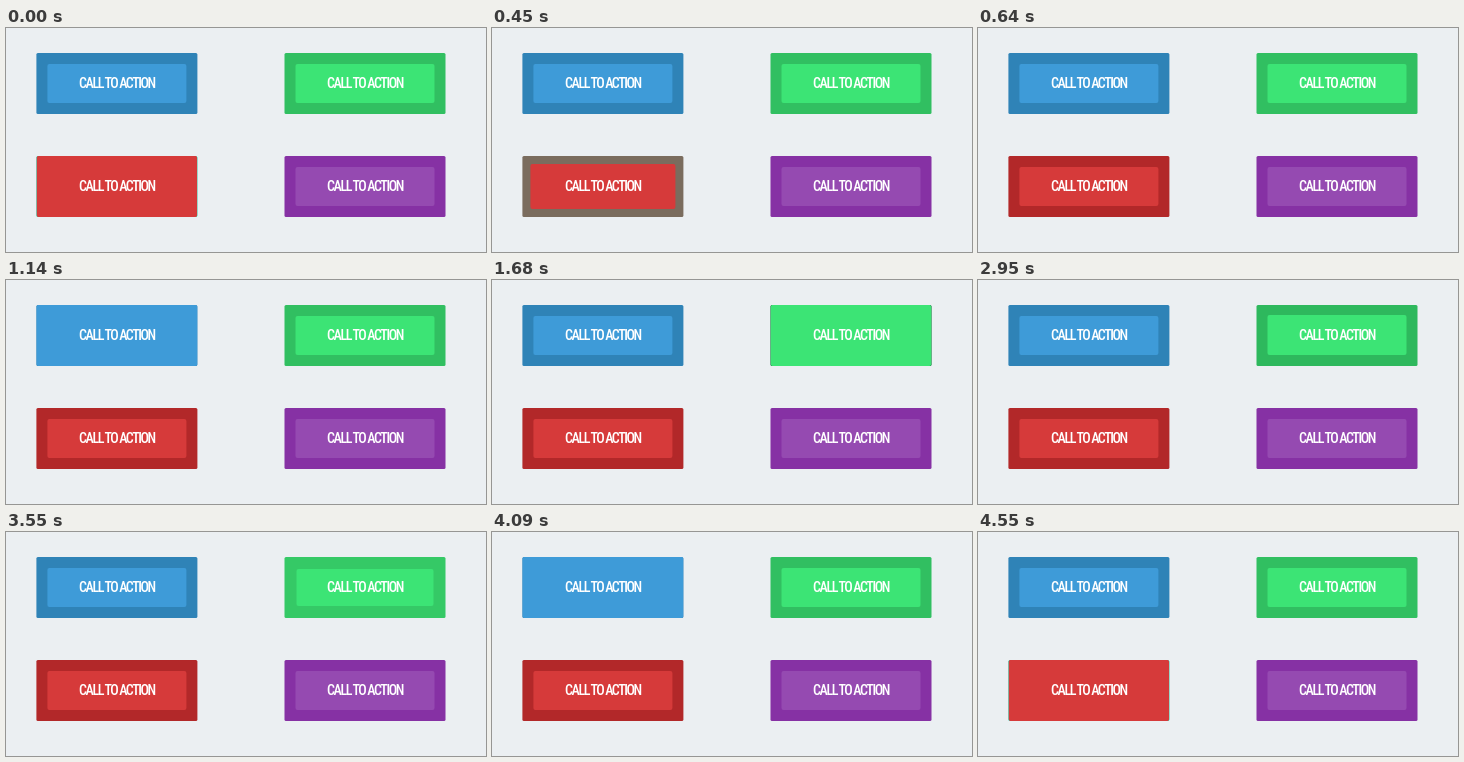
Write an HTML page that moves like this. It is 480 px wide and 224 px high and loops after 4.6 s.

```html
<!DOCTYPE html>
<html lang="en">
<head>
<meta charset="utf-8">
<title>Call to action buttons</title>
<style>
  html, body { margin: 0; width: 100%; height: 100%; overflow: hidden; background: #ebeff2; }
  .button {
    position: absolute;
    left: 0;
    top: 0;
    width: 161px;
    height: 60.5px;
    border-radius: 1.5px;
    overflow: hidden;
  }
  .face { position: absolute; inset: 11px 11.4px; border-radius: 2px; }
  .label {
    position: absolute;
    inset: 0;
    color: #fff;
    font: 500 14px/60px Oswald, "Roboto Condensed", "Liberation Sans Narrow", Roboto, sans-serif;
    font-stretch: 75%;
    letter-spacing: -1.4px;
    text-align: center;
    white-space: nowrap;
  }
</style>
</head>
<body>
<script>
const LOOP = 4600;
const MOVE = 300;
const BACK = 'cubic-bezier(.68, -.55, .265, 1.55)';

// toggles: times at which the pointer enters or leaves
const buttons = [
  { x: 30.4, y: 24.9, rim: '#2f83b7', face: '#3e9bd8', hover: '#2f83b7', toggles: [800, 1190, 3690, 4090] },
  { x: 278.5, y: 24.9, rim: '#31bf61', face: '#3ce475', hover: '#005024', toggles: [1340, 1780, 2840, 3328] },
  { x: 30.4, y: 127.9, rim: '#b22829', face: '#d63a3a', hover: '#00ffd0', toggles: [296, 4180], over: true },
  { x: 278.5, y: 127.9, rim: '#8631a4', face: '#954ab1', hover: '#8631a4', toggles: [1920, 2560] }
];

function play(el, rest, hover, { toggles, over = false }) {
  const pose = on => on ? hover : rest;
  const frames = [{ offset: 0, ...pose(over) }];
  let on = over;
  for (const time of toggles) {
    frames.push({ offset: time / LOOP, easing: BACK, ...pose(on) });
    on = !on;
    frames.push({ offset: (time + MOVE) / LOOP, ...pose(on) });
  }
  frames.push({ offset: 1, ...pose(on) });
  el.animate(frames, { duration: LOOP, iterations: Infinity }).startTime = 0;
}

function add(parent, className) {
  const el = document.createElement('div');
  el.className = className;
  return parent.appendChild(el);
}

for (const b of buttons) {
  const button = add(document.body, 'button');
  const face = add(button, 'face');
  add(button, 'label').textContent = 'CALL TO ACTION';
  button.style.transform = `translate(${b.x}px, ${b.y}px)`;
  face.style.background = b.face;
  play(button, { backgroundColor: b.rim }, { backgroundColor: b.hover }, b);
  play(face, { inset: '11px 11.4px' }, { inset: '0px 0px' }, b);
}
</script>
</body>
</html>
```
